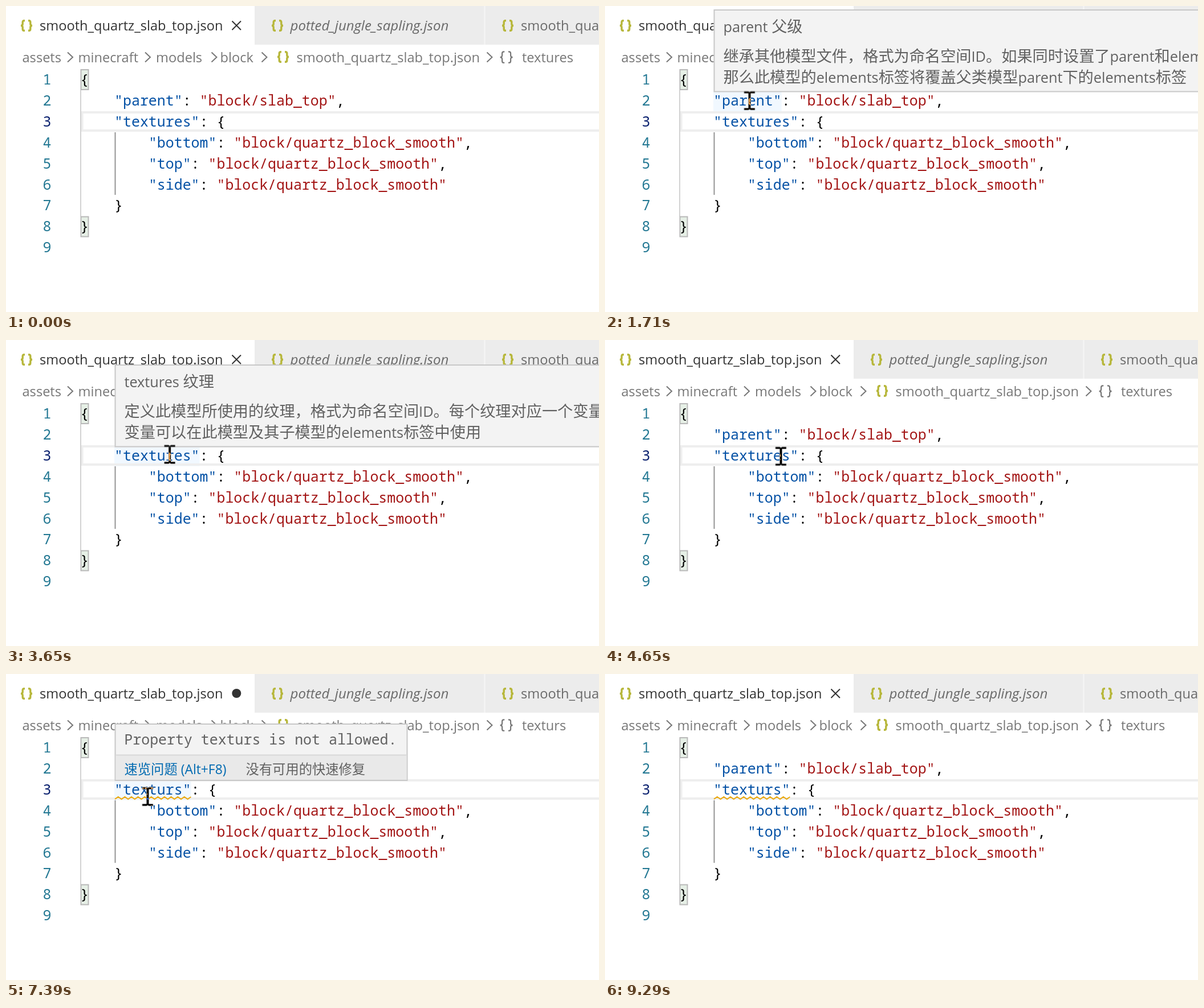
An HTML page that plays this animation: 1040 by 538 pixels, repeating every 9460 ms.

```html
<!DOCTYPE html>
<html lang="zh-CN">
<head>
<meta charset="utf-8">
<title>JSON editor hints</title>
<style>
html, body { margin: 0; width: 100%; height: 100%; overflow: hidden; background: #fff; }
svg { display: block; width: 1040px; height: 538px; }
text { white-space: pre; }

.ui { font: 23.6px "Open Sans", "Noto Sans", sans-serif; fill: #333; }
.dim { fill: #6a6a6a; }
.crumb { fill: #777; }
.italic { font-style: italic; font-size: 24.1px; }
.code { font: 24.92px "Noto Sans Mono", "DejaVu Sans Mono", monospace; fill: #000; }
.num { fill: #237893; text-anchor: end; }
.key { fill: #0451a5; }
.str { fill: #a31515; }
.hint { font: 27.2px "Noto Sans CJK SC", "Noto Sans CJK JP", "Noto Sans CJK", sans-serif; fill: #616161; }
.hint tspan { font: 25.3px "Open Sans", "Noto Sans", sans-serif; }
.small { font-size: 23.3px; }
.small tspan { font-size: 22.9px; }
.link { fill: #006ab1; }
.panel { fill: #f3f3f3; stroke: #c8c8c8; stroke-width: 2; }
.mark { fill: #f1f8ff; }
.match { fill: #e6f0e6; stroke: #b9b9b9; stroke-width: 2; }
.line { fill: none; stroke: #777; stroke-width: 2; }
.json { fill: none; stroke: #b7b73b; stroke-width: 3.4; }

/* Key times are milliseconds / 94.6 */
.good, .typo, .path1, .path2, .closed, .dirty, .tip1, .tip2, .tip3,
.caret, .arrow, .beam { animation: 9460ms step-end infinite; }
.good { animation-name: good; }
.typo { animation-name: typo; }
.path1 { animation-name: path1; }
.path2 { animation-name: path2; }
.closed { animation-name: closed; }
.dirty { animation-name: dirty; }
.tip1 { animation-name: tip1; }
.tip2 { animation-name: tip2; }
.tip3 { animation-name: tip3; }
.caret { animation-name: caret; }
.arrow { animation-name: move, arrow; }
.beam { animation-name: move, beam; fill: #fff; mix-blend-mode: difference; }

@keyframes good { 0% { opacity: 1 } 51.691%, 100% { opacity: 0 } }
@keyframes typo { 0% { opacity: 0 } 51.691%, 100% { opacity: 1 } }
@keyframes path1 { 0% { opacity: 1 } 55.285%, 100% { opacity: 0 } }
@keyframes path2 { 0% { opacity: 0 } 55.285%, 100% { opacity: 1 } }
@keyframes closed { 0% { opacity: 1 } 51.691% { opacity: 0 } 97.462%, 100% { opacity: 1 } }
@keyframes dirty { 0% { opacity: 0 } 51.691% { opacity: 1 } 97.462%, 100% { opacity: 0 } }

@keyframes tip1 {
  0% { opacity: 0 }
  15.856% { opacity: 0; animation-timing-function: steps(3) }
  18.076% { opacity: 1 }
  26.849%, 100% { opacity: 0 }
}
@keyframes tip2 {
  0% { opacity: 0 }
  32.875% { opacity: 0; animation-timing-function: steps(3) }
  35.095% { opacity: 1 }
  43.974%, 100% { opacity: 0 }
}
@keyframes tip3 {
  0% { opacity: 0 }
  64.27% { opacity: 0; animation-timing-function: steps(3) }
  66.49% { opacity: 1 }
  82.24%, 100% { opacity: 0 }
}
@keyframes caret {
  0% { opacity: 0; transform: translate(308px, 185px) }
  43.974% { opacity: 1; transform: translate(308px, 185px) }
  49.154% { opacity: 0; transform: translate(308px, 185px) }
  51.691%, 62.367%, 72.832%, 83.403%, 94.82% { opacity: 1; transform: translate(294px, 185px) }
  56.871%, 67.653%, 78.118%, 88.689%, 98.202%, 100% { opacity: 0; transform: translate(294px, 185px) }
}

@keyframes move {
  0% { transform: translate(-99px, -99px) }
  2.536% { transform: translate(911px, -14px); animation-timing-function: steps(4) }
  5.496% { transform: translate(520px, 255px); animation-timing-function: steps(2) }
  6.976% { transform: translate(330px, 326px); animation-timing-function: steps(3) }
  9.196% { transform: translate(109px, 250px); animation-timing-function: steps(4) }
  12.156% { transform: translate(253.5px, 166.5px) }
  22.41% { transform: translate(253.5px, 166.5px); animation-timing-function: steps(11) }
  30.549% { transform: translate(276.5px, 199.5px) }
  37.103% { transform: translate(276.5px, 199.5px); animation-timing-function: steps(6) }
  41.543% { transform: translate(308.5px, 204.5px) }
  56.131% { transform: translate(308.5px, 204.5px); animation-timing-function: steps(4) }
  59.09% { transform: translate(285px, 312px); animation-timing-function: steps(3) }
  61.31% { transform: translate(250.5px, 212.5px); animation-timing-function: steps(2) }
  62.79% { transform: translate(248.5px, 215.5px) }
  80.021% { transform: translate(248.5px, 215.5px); animation-timing-function: steps(2) }
  81.501% { transform: translate(262px, 221px); animation-timing-function: steps(12) }
  90.38% { transform: translate(938px, -19px) }
  91.12% { transform: translate(938px, -24px) }
  91.86%, 100% { transform: translate(-99px, -99px) }
}
@keyframes arrow { 0% { opacity: 1 } 4.016% { opacity: 0 } 85.94%, 100% { opacity: 1 } }
@keyframes beam { 0% { opacity: 0 } 4.016% { opacity: 1 } 85.94%, 100% { opacity: 0 } }
</style>
</head>
<body>
<svg viewBox="0 0 1040 538">
  <defs>
    <path id="braces" d="M8 1.7H6.8Q4.2 1.7 4.2 4.5V7.5Q4.2 10.5 1 10.5Q4.2 10.5 4.2 13.5V16.5Q4.2 19.3 6.8 19.3H8
      M14 1.7H15.2Q17.8 1.7 17.8 4.5V7.5Q17.8 10.5 21 10.5Q17.8 10.5 17.8 13.5V16.5Q17.8 19.3 15.2 19.3H14"/>
    <path id="chevron" d="M-4.5 -8.5L4.5 0L-4.5 8.5"/>
  </defs>
  <rect width="1040" height="538" fill="#fff"/>

  <!-- tabs -->
  <rect x="436" width="604" height="68" fill="#ececec"/>
  <rect x="838.5" width="2" height="68" fill="#f5f5f5"/>
  <g class="json">
    <use href="#braces" x="25" y="24"/>
    <use href="#braces" x="465" y="24"/>
    <use href="#braces" x="869" y="24"/>
    <use href="#braces" x="475" y="79"/>
  </g>
  <g class="ui">
    <text x="59" y="43">smooth_quartz_slab_top.json</text>
    <text class="dim italic" x="498.5" y="43">potted_jungle_sapling.json</text>
    <text class="dim" x="903" y="43">smooth_quartz_slab.json</text>
  </g>
  <path class="closed" d="M396.5 26.5L412 42M412 26.5L396.5 42" fill="none" stroke="#333" stroke-width="2"/>
  <circle class="dirty" cx="404.3" cy="34" r="8" fill="#333"/>

  <!-- breadcrumbs -->
  <g class="ui">
    <text class="crumb" x="28.5" y="98.5">assets</text>
    <text class="crumb" x="126.5" y="98.5">minecraft</text>
    <text class="crumb" x="263" y="98.5">models</text>
    <text class="crumb" x="375.5" y="98.5">block</text>
    <text class="crumb" x="509.5" y="98.5">smooth_quartz_slab_top.json</text>
    <g class="path1"><text class="crumb" x="905" y="98.5">textures</text></g>
    <g class="path2"><text class="crumb" x="905" y="98.5">texturs</text></g>
  </g>
  <g class="line">
    <use href="#chevron" x="112.5" y="90"/>
    <use href="#chevron" x="248.5" y="90"/>
    <use href="#chevron" x="365" y="90"/>
    <use href="#chevron" x="453" y="90"/>
    <use href="#chevron" x="848" y="90"/>
    <use href="#braces" transform="translate(865.5 78.5) scale(1.1)"/>
  </g>

  <!-- editor backdrop -->
  <rect class="mark tip1" x="190.1" y="148" width="119.6" height="37"/>
  <rect class="mark tip2" x="190.1" y="185" width="149.5" height="37"/>
  <rect class="mark tip3" x="190.1" y="185" width="134.6" height="37"/>
  <path d="M1050 187H133.5V219H1050" fill="none" stroke="#eee" stroke-width="4"/>
  <path d="M131 148V370" stroke="#d3d3d3" stroke-width="2"/>
  <path d="M191.5 222V332" stroke="#939393" stroke-width="2"/>
  <rect class="match" x="131.5" y="112" width="13" height="35"/>
  <rect class="match" x="131.5" y="370.5" width="13" height="35"/>

  <g class="code">
    <g id="nums"></g>
    <text x="130.3" y="138">{</text>
    <text x="190.1" y="174.9"><tspan class="key">"parent"</tspan>: <tspan class="str">"block/slab_top"</tspan>,</text>
    <text class="good" x="190.1" y="211.8"><tspan class="key">"textures"</tspan>: {</text>
    <text class="typo" x="190.1" y="211.8"><tspan class="key">"texturs"</tspan>: {</text>
    <text x="249.9" y="248.7"><tspan class="key">"bottom"</tspan>: <tspan class="str">"block/quartz_block_smooth"</tspan>,</text>
    <text x="249.9" y="285.6"><tspan class="key">"top"</tspan>: <tspan class="str">"block/quartz_block_smooth"</tspan>,</text>
    <text x="249.9" y="322.5"><tspan class="key">"side"</tspan>: <tspan class="str">"block/quartz_block_smooth"</tspan></text>
    <text x="190.1" y="359.4">}</text>
    <text x="130.3" y="396.3">}</text>
  </g>
  <path id="wave" class="path2" fill="none" stroke="#e9a60a" stroke-width="2"/>
  <rect class="caret" width="3" height="36"/>

  <!-- hover hints -->
  <g class="tip1">
    <rect class="panel" x="191.5" y="7" width="900" height="143.5"/>
    <text class="hint" x="207.5" y="46"><tspan>parent </tspan>父级</text>
    <text class="hint" x="207.5" y="98">继承其他模型文件，格式为命名空间<tspan>ID</tspan>。如果同时设置了<tspan>parent</tspan>和<tspan>elements</tspan>，</text>
    <text class="hint" x="207.5" y="135">那么此模型的<tspan>elements</tspan>标签将覆盖父类模型<tspan>parent</tspan>下的<tspan>elements</tspan>标签</text>
  </g>
  <g class="tip2">
    <rect class="panel" x="191.5" y="44" width="900" height="143.5"/>
    <text class="hint" x="207.5" y="83"><tspan>textures </tspan>纹理</text>
    <text class="hint" x="207.5" y="135">定义此模型所使用的纹理，格式为命名空间<tspan>ID</tspan>。每个纹理对应一个变量，</text>
    <text class="hint" x="207.5" y="172">变量可以在此模型及其子模型的<tspan>elements</tspan>标签中使用</text>
  </g>
  <g class="tip3">
    <rect class="panel" x="191.5" y="88" width="512" height="99"/>
    <rect x="192.5" y="142" width="510" height="44" fill="#e9e9e9"/>
    <path d="M192.5 142.5H702.5" stroke="#d8d8d8" stroke-width="2"/>
    <text class="code" x="207.3" y="124" style="fill:#616161">Property texturs is not allowed.</text>
    <text class="hint small link" x="207.5" y="176">速览问题<tspan> (Alt+F8)</tspan></text>
    <text class="hint small" x="420.5" y="176">没有可用的快速修复</text>
  </g>

  <!-- pointer -->
  <path class="arrow" d="M1 1V25L6.5 20L10.5 29L14.5 27L10.5 18.5H18Z" fill="#fff" stroke="#000" stroke-width="1.6"/>
  <path class="beam" d="M-9.5 -16.5H-2L0 -15L2 -16.5H9.5V-13H2V13H9.5V16.5H2L0 15L-2 16.5H-9.5V13H-2V-13H-9.5Z"/>
</svg>
<script>
const nums = document.getElementById('nums');
for (let i = 0; i < 9; i++) {
  const n = document.createElementNS('http://www.w3.org/2000/svg', 'text');
  n.setAttribute('class', 'num');
  n.setAttribute('x', 79.5);
  n.setAttribute('y', 138 + 36.9 * i);
  if (i === 2) n.style.fill = '#0b216f';
  n.textContent = i + 1;
  nums.append(n);
}

let wave = 'M191 220';
for (let i = 1; i < 24; i++) wave += `L${(191 + i * 5.8).toFixed(1)} ${i % 2 ? 216 : 220}`;
document.getElementById('wave').setAttribute('d', wave);
</script>
</body>
</html>
```
